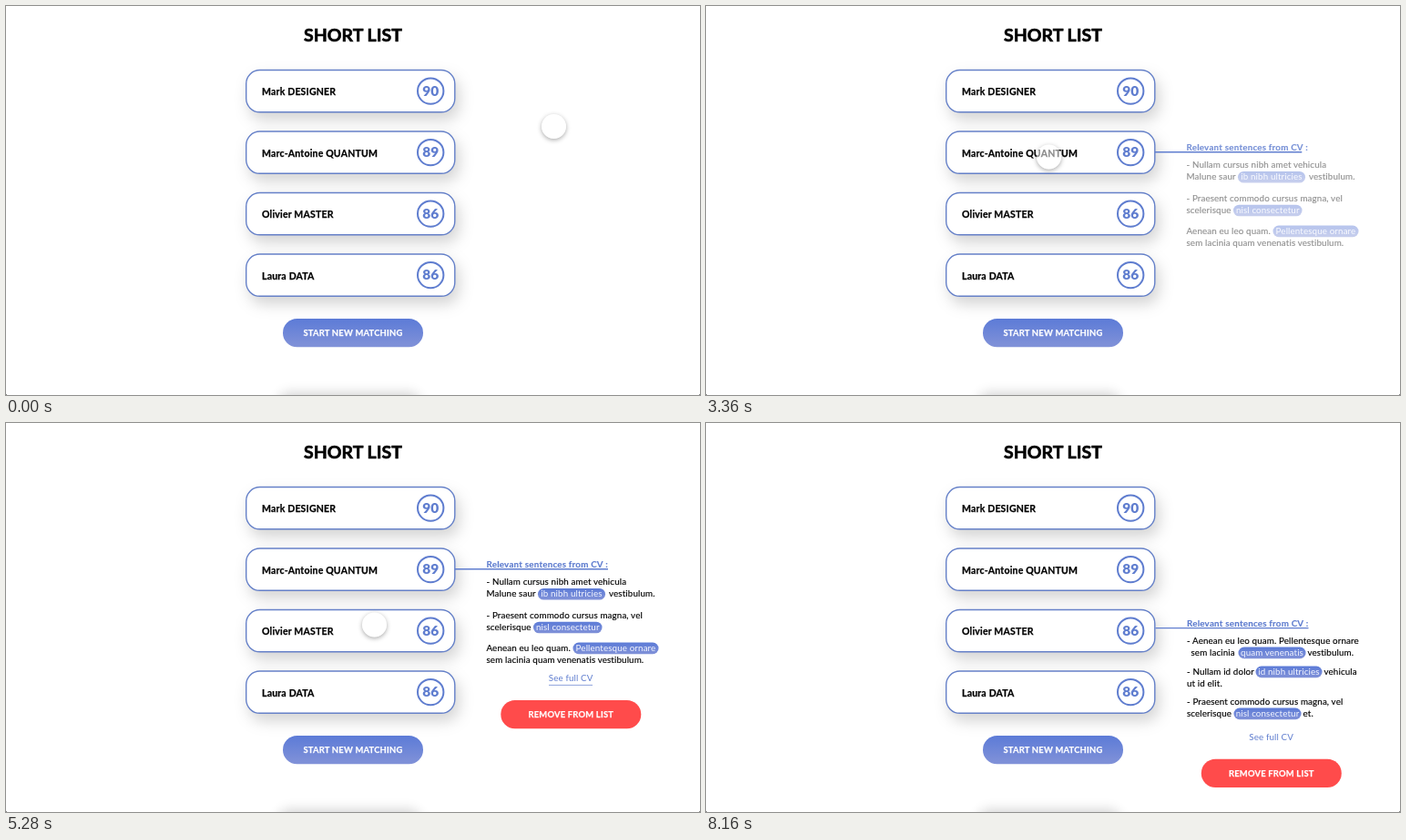
Recreate the animation shown at these times as an HTML page. Size 762 by 428 pixels, loop 8.88 s.

```html
<!DOCTYPE html>
<html lang="en">
<head>
<meta charset="utf-8">
<title>Short list</title>
<style>
  html, body { margin: 0; width: 100%; height: 100%; overflow: hidden; background: #fff; }
  svg { display: block; width: 762px; height: 428px; }
  text { font-family: Lato, "Open Sans", sans-serif; font-size: 9.8px; letter-spacing: .12px; fill: #000; stroke: #000; stroke-width: .15; }
  .title { font-size: 19.5px; font-weight: 700; letter-spacing: 0; stroke-width: .6; }
  .name { font-size: 10.5px; font-weight: 700; letter-spacing: .2px; stroke-width: .25; }
  .score { font-size: 15.5px; font-weight: 900; letter-spacing: 0; fill: #5f7dcf; stroke: none; }
  .heading { font-weight: 700; letter-spacing: .22px; fill: #5f7dcf; stroke: #5f7dcf; }
  .label { font-size: 9.4px; font-weight: 700; letter-spacing: .22px; fill: #fff; stroke: #fff; stroke-width: .25; }
  .mark { fill: #f4f6ff; stroke: none; }
  .link { fill: #5f7dcf; stroke: none; }
  .mid { text-anchor: middle; }
  .card { fill: #fff; stroke: #6580c8; stroke-width: 1.4; filter: drop-shadow(4px 8px 8px rgba(0, 0, 0, .17)); }
  .ring { fill: none; stroke: #5f7dcf; stroke-width: 2; }
  .rule { stroke: #5f7dcf; stroke-width: 1.4; }
  #cursor {
    position: absolute; left: -13.5px; top: -13.5px; width: 27px; height: 27px; border-radius: 50%;
    background: rgba(255, 255, 255, .55); box-shadow: 0 1.5px 5px rgba(0, 0, 0, .34);
  }
</style>
</head>
<body>
<svg id="stage" viewBox="0 0 762 428">
  <defs>
    <linearGradient id="blue" x2="0" y2="1">
      <stop stop-color="#5c7bd7"/><stop offset="1" stop-color="#8192d8"/>
    </linearGradient>
    <filter id="soft" x="-20%" y="-150%" width="140%" height="400%"><feGaussianBlur stdDeviation="7"/></filter>
  </defs>
</svg>
<div id="cursor"></div>
<script>
const LOOP = 8880, STEP = 80;
const stage = document.getElementById('stage');
const cursor = document.getElementById('cursor');

const text = (x, y, cls, str) => `<text x="${x}" y="${y}" class="${cls}">${str}</text>`;
const button = (x, y, fill, label) =>
  `<rect x="${x}" y="${y}" width="154" height="31.3" rx="15.6" fill="${fill}"/>` +
  text(x + 77, y + 18.7, 'label mid', label);
const pill = (x, y, width, str) =>
  `<rect x="${x}" y="${y - 9}" width="${width}" height="12.6" rx="6.3" fill="url(#blue)"/>` +
  text(x + width / 2, y, 'mark mid', str);

const candidates = [['Mark DESIGNER', 90], ['Marc-Antoine QUANTUM', 89], ['Olivier MASTER', 86], ['Laura DATA', 86]];
const card = ([name, score], i) => {
  const y = 93.6 + i * 67.5;
  return `<rect class="card" x="263.7" y="${y - 23.1}" width="229.1" height="46.3" rx="15"/>` +
    text(281, y + 4.6, 'name', name) +
    `<circle class="ring" cx="466.2" cy="${y}" r="14.2"/>` +
    text(466.2, y + 5.2, 'score mid', score);
};

const praesent = '- Praesent commodo cursus magna, vel';
const firstQuote =
  text(527.5, 109.5, '', '- Aenean eu leo quam. Pellentesque ornare') +
  text(532, 122.6, '', 'sem lacinia') + pill(584, 122.6, 74, 'quam venenatis') + text(660, 122.6, '', 'vestibulum.') +
  text(527.5, 143.6, '', '- Nullam id dolor') + pill(603, 143.6, 73, 'id nibh ultricies') + text(678, 143.6, '', 'vehicula') +
  text(527.5, 157, '', 'ut id elit.') +
  text(527.5, 176.5, '', praesent) +
  text(527.5, 189.6, '', 'scelerisque') + pill(579, 189.6, 74, 'nisl consectetur') + text(655, 189.6, '', 'et.');
const secondQuote =
  text(527.5, 109.5, '', '- Nullam cursus nibh amet vehicula') +
  text(527.5, 122.7, '', 'Malune saur') + pill(584, 122.7, 74, 'ib nibh ultricies') + text(662, 122.7, '', 'vestibulum.') +
  text(527.5, 146.4, '', praesent) +
  text(527.5, 159.5, '', 'scelerisque') + pill(579, 159.5, 75.5, 'nisl consectetur') +
  text(527.5, 182.4, '', 'Aenean eu leo quam.') + pill(622.5, 182.4, 94, 'Pellentesque ornare') +
  text(527.5, 195.5, '', 'sem lacinia quam venenatis vestibulum.');

const panels = [
  { start: 1040, end: 3200, dx: 0, dy: 0, quote: firstQuote },
  { start: 3200, end: 5360, dx: 0, dy: 68.2, quote: secondQuote, underline: true },
  { start: 5360, end: LOOP, dx: .5, dy: 133, quote: firstQuote }
];
const panelMarkup = p => `<g class="panel" transform="translate(${p.dx} ${p.dy})">
  <line class="rule" x1="493" x2="661" y1="92.6" y2="92.6"/>
  <g>${text(527.5, 91, 'heading', 'Relevant sentences from CV :')}</g>
  <g>${p.quote}</g>
  <g>${text(620.2, 216, 'link mid', 'See full CV')}
    ${p.underline ? '<path d="M596 220.2h48" stroke="#5f7dcf" stroke-width=".7"/>' : ''}</g>
  <g>${button(543.3, 236.8, '#ff4b4b', 'REMOVE FROM LIST')}</g>
</g>`;

stage.insertAdjacentHTML('beforeend',
  '<rect x="300" y="426" width="154" height="24" rx="10" opacity=".18" filter="url(#soft)"/>' +
  '<path d="M0 427h1v1h-1zM761 427h1v1h-1z" fill="#888"/>' +
  text(381, 39, 'title mid', 'SHORT LIST') +
  candidates.map(card).join('') +
  button(304, 344, 'url(#blue)', 'START NEW MATCHING') +
  panels.map(panelMarkup).join(''));
const panelNodes = [...stage.querySelectorAll('.panel')];

const progress = (t, from, to) => Math.min(1, Math.max(0, (t - from) / (to - from)));
const easeOut = p => 1 - (1 - p) ** 2;
const easeInOut = p => p < .5 ? 2 * p * p : 1 - 2 * (1 - p) ** 2;

// Each move: start time, end time, destination
const moves = [
  [0, 960, 414, 102], [2560, 3120, 376, 165.5], [4560, 5200, 404, 221.5],
  [5280, 5440, 403.7, 224], [7280, 8160, 560, -20]
];

function cursorAt(t) {
  let x = 601, y = 132;
  for (const [from, to, toX, toY] of moves) {
    const p = easeInOut(progress(t, from, to));
    x += (toX - x) * p;
    y += (toY - y) * p;
  }
  return [x, y];
}

function drawPanel(node, { start, end }, t) {
  const age = t - start;
  const [rule, heading, quote, link, remove] = node.children;
  const reveal = (el, from, to) => el.setAttribute('opacity', easeOut(progress(age, from, to)));
  node.setAttribute('opacity', age > 0 ? 1 - progress(t, end, end + 160) : 0);
  rule.setAttribute('x2', 493 + 168 * easeOut(progress(age, 0, 200)));
  reveal(heading, 40, 240);
  reveal(quote, 80, 400);
  reveal(link, 400, 880);
  reveal(remove, 960, 1360);
}

function draw(now) {
  const t = Math.floor(now % LOOP / STEP) * STEP;
  panels.forEach((p, i) => drawPanel(panelNodes[i], p, t));
  const [x, y] = cursorAt(t);
  cursor.style.transform = `translate(${x}px, ${y}px)`;
}

let origin;
function tick(now) {
  origin ??= now;
  draw(now - origin);
  requestAnimationFrame(tick);
}
draw(0);
requestAnimationFrame(tick);
</script>
</body>
</html>
```
